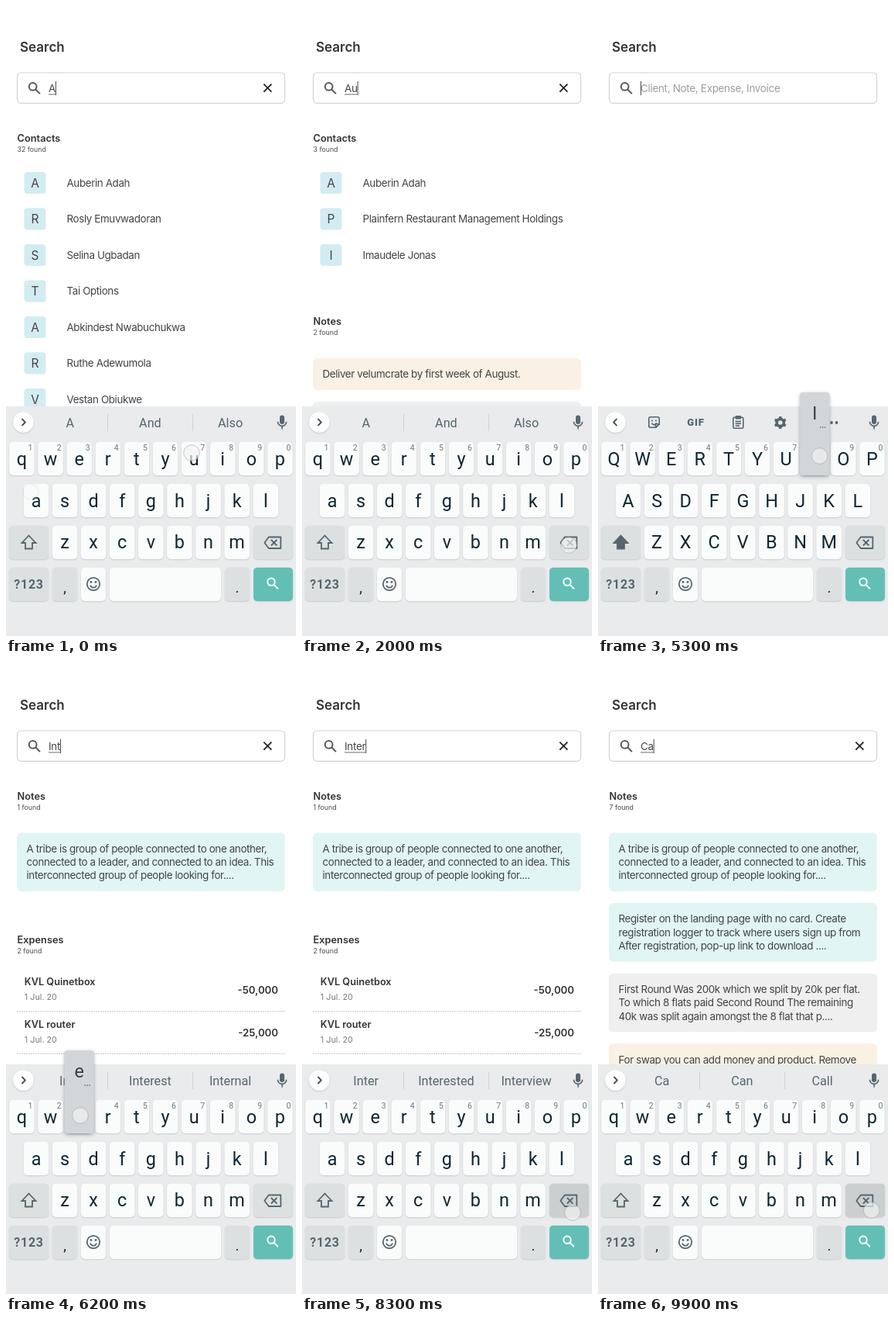
Animation of 375x812 px, one loop 10000 ms. Source, as an HTML page with a canvas:

```html
<!DOCTYPE html>
<html lang="en">
<head>
<meta charset="utf-8">
<title>Search</title>
<style>
html, body { margin: 0; width: 100%; height: 100%; overflow: hidden; background: #fff; }
canvas { display: block; width: 375px; height: 812px; }
</style>
</head>
<body>
<canvas id="stage"></canvas>
<script>
const W = 375, H = 812, LOOP = 10000, STEP = 100;
const canvas = document.getElementById('stage');
const c = canvas.getContext('2d');
const dpr = window.devicePixelRatio || 1;
canvas.width = W * dpr;
canvas.height = H * dpr;

const APP = 'Inter, "Open Sans", sans-serif';
const KEYS = 'Roboto, "Noto Sans", sans-serif';
const INK = '#434345', HEAD = '#333335', SLATE = '#56666e', KEY_INK = '#0d2631';

// Typed text over time
const typing = [
  [0, 'A'], [200, 'Au'], [2100, 'A'], [2400, ''], [3300, 'S'], [4700, ''],
  [5450, 'I'], [5600, 'In'], [6100, 'Int'], [6300, 'Inte'], [6600, 'Inter'],
  [7100, 'Intern'], [7200, 'Interne'], [8200, 'Intern'], [8300, 'Inter'],
  [8450, 'Inte'], [8500, 'Int'], [8600, 'In'], [8700, 'I'], [8800, ''],
  [9000, 'C'], [9300, 'Ca']
];
const caretOff = [[1000, 1200], [5800, 6000], [7500, 7900]];
const deleting = [[2200, 2400], [4500, 4700], [8100, 8800], [9800, 10000]];

// start, end, letter
const popups = [
  [100, 200, 'u'], [3300, 3600, 'S'], [5200, 5400, 'I'], [6000, 6100, 't'],
  [6200, 6300, 'e'], [6500, 6600, 'r'], [7100, 7200, 'e'], [8900, 9000, 'C'], [9200, 9300, 'a']
];

// start, end, then points: time, x, y
const touches = [
  [0, 300, [0, 240, 576]],
  [1500, 2500, [1500, 341, 692], [2500, 349, 698]],
  [3300, 3700, [3300, 75.5, 625]],
  [4500, 5000, [4500, 343, 693]],
  [5200, 5500, [5200, 286.5, 580]],
  [5500, 5700, [5500, 262, 689]],
  [6000, 6200, [6000, 169, 582]],
  [6200, 6400, [6200, 96, 582]],
  [6500, 6700, [6500, 132, 582]],
  [7000, 7100, [7000, 262, 690]],
  [7100, 7200, [7100, 96, 582]],
  [7300, 8900, [8100, 357, 713], [8300, 350, 707], [8800, 350, 704]],
  [8900, 9100, [8900, 150, 690]],
  [9200, 9400, [9200, 38, 636]],
  [9700, 10100, [9700, 350, 703], [9900, 353.7, 704]]
];

const words = {
  A: ['A', 'And', 'Also'], Au: ['Au', 'August', 'Aunt'], S: ['S', 'So', 'She'],
  I: ['I', 'It', 'Is'], In: ['In', 'Into', 'Inside'], Int: ['Int', 'Into', 'Intend'],
  Inte: ['Inte', 'Interest', 'Internal'], Inter: ['Inter', 'Interested', 'Interview'],
  Intern: ['Intern', 'Internet', 'Internal'], Interne: ['Interne', 'Internet', 'Internal'],
  C: ['C', 'Can', 'Call'], Ca: ['Ca', 'Can', 'Call']
};

const people = {
  au: 'Auberin Adah', ro: 'Rosly Emuvwadoran', se: 'Selina Ugbadan', ta: 'Tai Options',
  ab: 'Abkindest Nwabuchukwa', ru: 'Ruthe Adewumola', ve: 'Vestan Obiukwe',
  pl: 'Plainfern Restaurant Management Holdings', im: 'Imaudele Jonas', as: 'Asabiri Wokenma'
};
const MINT = '#e1f6f4', CREAM = '#faf0e3', GREY = '#efeff0';
const tribe = [MINT, 'A tribe is group of people connected to one another,',
  'connected to a leader, and connected to an idea. This', 'interconnected group of people looking for....'];
const landing = [MINT, 'Register on the landing page with no card. Create',
  'registration logger to track where users sign up from', 'After registration, pop-up link to download ....'];
const flats = [GREY, 'First Round Was 200k which we split by 20k per flat.',
  'To which 8 flats paid Second Round The remaining', '40k was split again amongst the 8 flat that p....'];
const swap = [CREAM, 'For swap you can add money and product. Remove'];
const deliver = [CREAM, 'Deliver velumcrate by first week of August.'];

const contacts = (n, ids) => ({ kind: 'Contacts', n, items: ids.split(' ').map(id => people[id]) });
const notes = (n, ...items) => ({ kind: 'Notes', n, items });
const bills = { kind: 'Expenses', n: 2, items: [['KVL Quinetbox', '-50,000'], ['KVL router', '-25,000']] };
const interResult = [notes(1, tribe), bills];
const inResult = [contacts(2, 'au pl'), notes(1, tribe)];
const cardResult = [notes(7, tribe, landing, flats, swap)];
const results = {
  '': [],
  A: [contacts(32, 'au ro se ta ab ru ve')],
  Au: [contacts(3, 'au pl im'), notes(2, deliver, [GREY, ''])],
  S: [contacts(21, 'au ro se ta ab ve as')],
  I: inResult, In: inResult,
  C: cardResult, Ca: cardResult
};

function text(s, x, y, size, color, o = {}) {
  c.font = `${o.weight || 400} ${size}px ${o.family || APP}`;
  c.letterSpacing = (o.space || 0) + 'px';
  c.textAlign = o.align || 'left';
  c.textBaseline = 'alphabetic';
  c.fillStyle = color;
  c.fillText(s, x, y);
  return c.measureText(s).width;
}
const body = (s, x, y) => text(s, x, y, 13.4, INK, { space: -0.38 });
const input = (s, color) => text(s, 55, 110.6, 13.4, color, { space: -0.28 });
const bold = (s, x, y, size, align) => text(s, x, y, size, HEAD, { weight: 600, align });
const keyText = (s, x, y, size, color, o) => text(s, x, y, size, color, { family: KEYS, align: 'center', ...o });

function box(x, y, w, h, r, fill) {
  c.beginPath();
  c.roundRect(x, y, w, h, r);
  if (fill) { c.fillStyle = fill; c.fill(); }
}
function disc(x, y, r, fill) {
  c.beginPath();
  c.arc(x, y, r, 0, 7);
  c.fillStyle = fill;
  c.fill();
}
function pen(color, width) {
  c.strokeStyle = color;
  c.lineWidth = width;
}
function line(...p) {
  c.beginPath();
  for (let i = 0; i < p.length; i += 2) c.lineTo(p[i], p[i + 1]);
  c.stroke();
}
function ring(x, y, r, a = 0, b = Math.PI * 2) {
  c.beginPath();
  c.arc(x, y, r, a, b);
  c.stroke();
}
function shadow(color, blur, dy) {
  c.shadowColor = color;
  c.shadowBlur = blur * dpr;
  c.shadowOffsetY = dy * dpr;
}
const noShadow = () => shadow('transparent', 0, 0);

function lens(x, y, r, color, width) {
  pen(color, width);
  ring(x - r * 0.4, y - r * 0.4, r);
  line(x + r * 0.3, y + r * 0.3, x + r * 1.5, y + r * 1.5);
}

function drawField(s, caret) {
  text('Search', 18, 59, 17, HEAD, { weight: 600 });
  box(14.5, 86, 346, 39.3, 5);
  pen('#d3d3d5', 1.2);
  c.stroke();
  lens(36.6, 105.8, 4.9, '#58585a', 2);
  let end = 55;
  if (s) {
    end += input(s, INK);
    c.fillStyle = '#6a6a6c';
    c.fillRect(55, 113.4, end - 55, 1);
    pen('#262628', 1.9);
    line(333.3, 100.6, 343.3, 110.6);
    line(343.3, 100.6, 333.3, 110.6);
  } else {
    input('Client, Note, Expense, Invoice', '#9c9c9e');
  }
  if (caret) {
    c.fillStyle = '#4a4a4c';
    c.fillRect(end, 97, 1, 18);
  }
}

function drawResults(sections) {
  let y = 170;
  for (const { kind, n, items } of sections) {
    bold(kind, 14.5, y + 4.7, 12.8);
    text(n + ' found', 14.5, y + 17.6, 8.8, '#4a4a4c');
    if (kind === 'Contacts') {
      items.forEach((name, i) => {
        const my = y + 58 + i * 46.5;
        box(23.5, my - 14, 28, 28, 4, '#d3ecf2');
        text(name[0], 37.5, my + 5.5, 15.5, INK, { align: 'center' });
        body(name, 78.5, my + 4.8);
      });
      y += 34.7 + items.length * 46.5;
    } else if (kind === 'Notes') {
      y += 47.5;
      for (const [fill, ...lines] of items) {
        const h = 41 + (lines.length - 1) * 17.3;
        box(14, y, 347, h, 6, fill);
        lines.forEach((s, i) => body(s, 26.5, y + 25.2 + i * 17.3));
        y += h + 15;
      }
      y -= 15;
    } else {
      items.forEach(([name, sum], i) => {
        const top = y + i * 54.5;
        bold(name, 23.8, top + 58.5, 12.7);
        text('1 Jul. 20', 23.8, top + 77.5, 10.8, '#7b7b7d');
        bold(sum, 352, top + 69.8, 13.2, 'right');
        pen('#c4c4c6', 1);
        c.setLineDash([2, 1]);
        line(14, top + 92.3, 361, top + 92.3);
        c.setLineDash([]);
      });
      y += 92 + items.length * 54.5;
    }
    y += 62.4;
  }
}

const rows = [['qwertyuiop', 20.5, 562], ['asdfghjkl', 39, 616], ['zxcvbnm', 76, 670]];
const PITCH = 37.1;
const LIGHT = '#fafbfb', DIM = '#dde0e1', PRESSED = '#cccfd0';

function key(x, y, w, fill) {
  shadow('rgba(60,75,80,.22)', 1.5, 0.8);
  box(x, y - 0.3, w, 43.3, 5, fill);
  noShadow();
}

function drawMic(x, y) {
  box(x - 3, y - 9, 6, 11.5, 3, SLATE);
  pen(SLATE, 1.7);
  ring(x, y - 0.7, 5.6, 0, Math.PI);
  line(x, y + 5, x, y + 9);
}

function drawGear(x, y) {
  pen(SLATE, 3.6);
  ring(x, y, 4.6);
  pen(SLATE, 3.4);
  for (let i = 0; i < 6; i++) {
    const a = i * Math.PI / 3 + Math.PI / 6, dx = Math.cos(a), dy = Math.sin(a);
    line(x + dx * 5, y + dy * 5, x + dx * 8, y + dy * 8);
  }
}

function drawTools() {
  pen(SLATE, 1.6);
  box(65.8, 529.8, 13.4, 13.4, 2);
  c.stroke();
  disc(70, 534.5, 1.1, SLATE);
  disc(75, 534.5, 1.1, SLATE);
  ring(72.5, 536.4, 3.2, 0.3, 2.8);
  box(75.5, 539.5, 5, 5, 0, '#e9ebec');
  line(74.6, 543.4, 74.6, 538.8, 79.4, 538.8, 74.6, 543.4);
  keyText('GIF', 126.5, 541, 13, SLATE, { weight: 900, space: 0.8 });
  box(174.8, 530.3, 13, 14, 1.5);
  c.stroke();
  box(177.5, 528, 7.6, 4.5, 1, SLATE);
  for (const y of [535.5, 538.3, 541.1]) line(177.6, y, y > 540 ? 183 : 185, y);
  drawGear(235.7, 537);
  for (const x of [295.5, 302, 308.5]) disc(x, 537, 1.9, SLATE);
}

function drawStrip(s) {
  shadow('rgba(60,75,80,.25)', 2, 0.8);
  disc(22.5, 536.5, 13.3, '#fff');
  noShadow();
  pen('#44535a', 1.8);
  const d = s ? 1 : -1;
  line(22.5 - 2 * d, 532, 22.5 + 2.4 * d, 536.5, 22.5 - 2 * d, 541);
  drawMic(357, 536.5);
  if (!s) return drawTools();
  words[s].forEach((w, i) => keyText(w, 82.7 + i * 103.7, 542.5, 16.2, SLATE));
  pen('#cdd2d4', 1);
  line(131.5, 526, 131.5, 548);
  line(241.5, 526, 241.5, 548);
}

function drawKeys(upper, erase) {
  rows.forEach(([letters, x0, y], r) => [...letters].forEach((ch, i) => {
    const x = x0 + i * PITCH;
    key(x - 16.3, y, 32.6, LIGHT);
    keyText(upper ? ch.toUpperCase() : ch, x, y + 29.7 - r * 0.2, 23.4, KEY_INK);
    if (!r) keyText((i + 1) % 10, x + 11, y + 11, 10.5, '#6a787e');
  }));

  key(4, 670, 51, DIM);
  pen(SLATE, 1.8);
  c.lineJoin = 'miter';
  c.beginPath();
  const arrow = [0, -9, 9, 0.5, 4.5, 0.5, 4.5, 8, -4.5, 8, -4.5, 0.5, -9, 0.5];
  for (let i = 0; i < arrow.length; i += 2) c.lineTo(29.5 + arrow[i], 691.5 + arrow[i + 1]);
  c.closePath();
  if (upper) { c.fillStyle = SLATE; c.fill(); }
  c.stroke();

  key(320, 670, 51, erase ? PRESSED : DIM);
  pen(SLATE, 1.8);
  c.lineJoin = 'round';
  line(339.7, 684.5, 355.3, 684.5, 355.3, 699, 339.7, 699, 334.3, 691.8, 339.7, 684.5, 342, 684.5);
  line(342.8, 688, 350.3, 695.5);
  line(350.3, 688, 342.8, 695.5);

  key(4, 724, 51, DIM);
  keyText('?123', 29.5, 751, 16, SLATE, { weight: 700, space: 0.8 });
  key(60, 724, 32, DIM);
  keyText(',', 76, 756, 19, KEY_INK);
  key(97, 724, 32, LIGHT);
  pen(SLATE, 1.8);
  ring(113, 745, 8.2);
  disc(110, 742.5, 1.4, SLATE);
  disc(116, 742.5, 1.4, SLATE);
  ring(113, 745.5, 4.2, 0.25, 2.9);
  key(134, 724, 144, LIGHT);
  key(283, 724, 32, DIM);
  keyText('.', 299, 756, 19, KEY_INK);
  key(320, 724, 51, '#63bfb5');
  lens(344.8, 744.2, 4.7, '#fff', 2);
}

function drawPopup(ch) {
  const low = ch.toLowerCase();
  const [letters, x0, y] = rows.find(r => r[0].includes(low));
  const x = x0 + letters.indexOf(low) * PITCH;
  shadow('rgba(50,60,65,.4)', 4, 1.5);
  box(x - 19, y - 64, 38, 107, 4, '#d3d6d8');
  noShadow();
  keyText(ch, x, y - 29, 23.4, '#33434a');
  if ('aceinosuyz'.includes(low))
    for (let i = 0; i < 3; i++) disc(x + 7.5 + i * 3, y - 19, 0.8, '#4a575d');
}

function drawTouch(x, y, alpha = 1) {
  c.globalAlpha = alpha;
  disc(x, y, 10.3, 'rgba(240,242,242,.68)');
  pen('rgba(150,156,158,.5)', 1);
  ring(x, y, 10.3);
  c.globalAlpha = 1;
}

function along(points, t) {
  let a = points[0];
  for (const b of points) {
    if (t < b[0]) {
      const k = b[0] > a[0] ? Math.max(0, (t - a[0]) / (b[0] - a[0])) : 0;
      return [a[1] + (b[1] - a[1]) * k, a[2] + (b[2] - a[2]) * k];
    }
    a = b;
  }
  return [a[1], a[2]];
}

const typedAt = t => typing.filter(e => e[0] <= t).pop()[1];
const during = t => ([a, b]) => t >= a && t < b;

function draw(t) {
  const now = during(t);
  const s = typedAt(t);
  const ahead = typedAt(Math.min(t + 120, LOOP - 1)); // the keyboard reacts before the field
  c.setTransform(dpr, 0, 0, dpr, 0, 0);
  c.fillStyle = '#fff';
  c.fillRect(0, 0, W, H);
  drawField(s, !caretOff.some(now));
  drawResults(results[s] || interResult);

  c.fillStyle = '#e9ebec';
  c.fillRect(0, 516, W, H - 516);
  drawStrip(ahead);
  drawKeys(!ahead, deleting.some(now));
  popups.filter(now).forEach(p => drawPopup(p[2]));
  if (t < 100) drawTouch(32, 626, 0.3);
  for (const [, end, ...points] of touches.filter(now))
    drawTouch(...along(points, t), t >= end - STEP ? 0.4 : 1);
}

const start = performance.now();
function tick() {
  const t = (performance.now() - start) % LOOP;
  draw(Math.floor(t / STEP) * STEP);
  requestAnimationFrame(tick);
}
tick();
</script>
</body>
</html>
```
